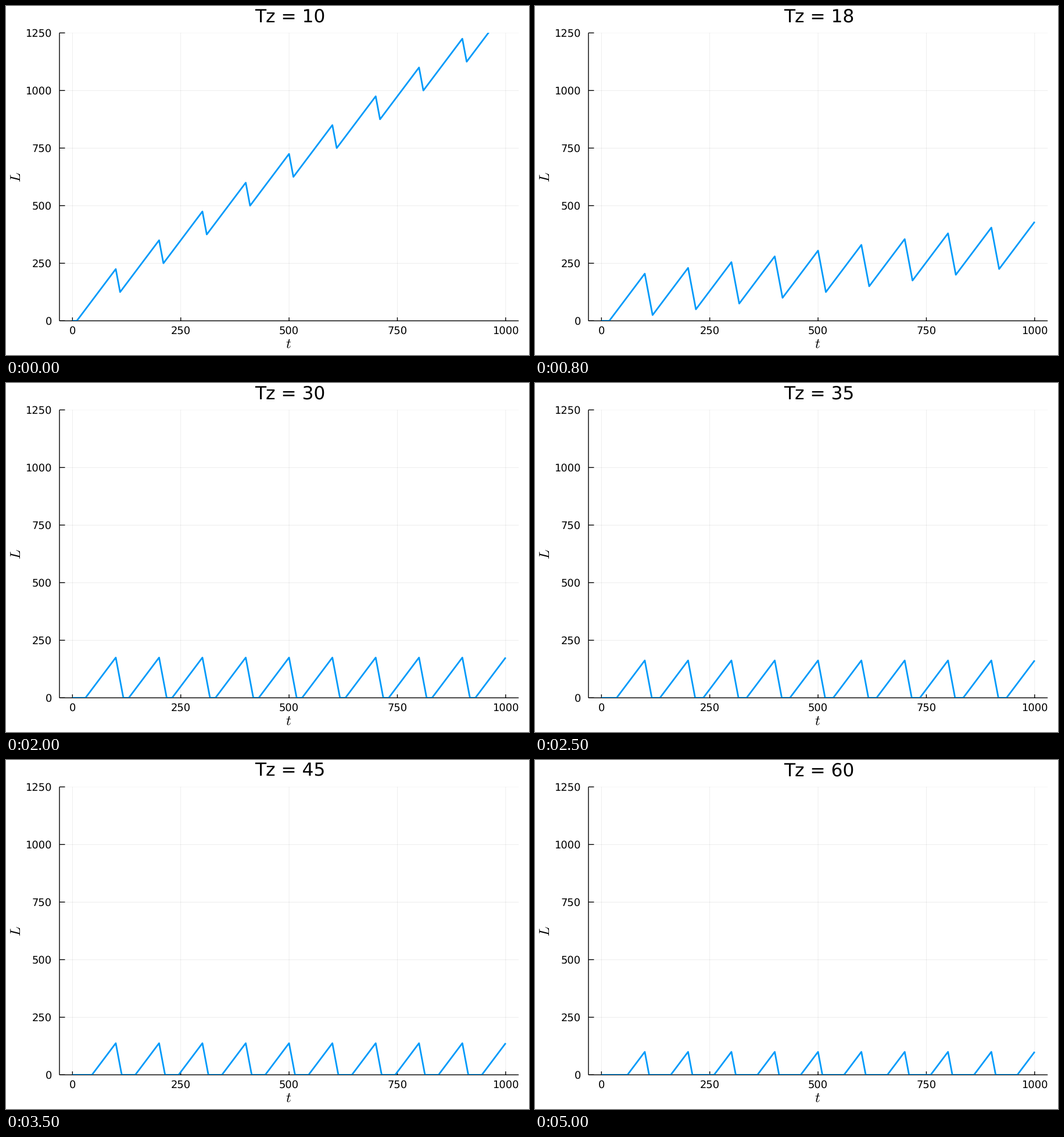
A matplotlib script that plays this animation: 900x600 px, repeating every 5.1 s.

```python
import numpy as np
import matplotlib.pyplot as plt
from matplotlib.animation import FuncAnimation
from matplotlib.patches import Rectangle

W, H, DPI = 900, 600, 100
PT = 72 / DPI  # points per pixel
LEFT, RIGHT, TOP, BOTTOM = 92.0, 882.2, 46.3, 541.3
T_MIN, T_MAX, L_MAX = -30, 1030, 1250
PERIOD, RISE, FALL = 100, 2.5, 10
FIRST_TZ, FRAMES = 10, 51

plt.rcParams.update({
    "font.family": "DejaVu Sans",
    "mathtext.fontset": "cm",
    "text.hinting": "no_hinting",
    "path.simplify": False,
})


def px(t):
    return LEFT + (t - T_MIN) / (T_MAX - T_MIN) * (RIGHT - LEFT)


def py(level):
    return BOTTOM - level / L_MAX * (BOTTOM - TOP)


def queue(tz):
    """Queue length per second: drains while t mod PERIOD < tz, else grows."""
    levels = [0.0]
    for t in range(1000):
        step = -FALL if t % PERIOD < tz else RISE
        levels.append(max(0.0, levels[-1] + step))
    return np.array(levels)


fig = plt.figure(figsize=(W / DPI, H / DPI), dpi=DPI, facecolor="white")
ax = fig.add_axes([0, 0, 1, 1])
ax.set_xlim(0, W)
ax.set_ylim(H, 0)
ax.axis("off")


def segment(x0, y0, x1, y1, width, **style):
    ax.plot([x0, x1], [y0, y1], color="black", lw=width * PT, snap=False,
            solid_capstyle="butt", **style)


def label(x, y, text, size, **style):
    return ax.text(x, y, text, fontsize=size * PT, va="baseline", **style)


X_TICK = 0.012 * (BOTTOM - TOP)
Y_TICK = 0.012 * (RIGHT - LEFT)

for value in range(0, 1251, 250):
    y = py(value)
    segment(LEFT, y, RIGHT, y, 0.7, alpha=0.05 if value == L_MAX else 0.1)
    segment(LEFT, y, LEFT + Y_TICK, y, 1.4)
    label(79, y + 6.5, str(value), 17.9, ha="right")

for value in range(0, 1001, 250):
    x = px(value)
    segment(x, TOP, x, BOTTOM, 0.7, alpha=0.1)
    segment(x, BOTTOM, x, BOTTOM - X_TICK, 1.4)
    label(x, 564, str(value), 17.9, ha="center")

segment(LEFT, BOTTOM, RIGHT, BOTTOM, 1.4)
segment(LEFT, TOP, LEFT, BOTTOM, 1.4)

label(486.5, 587.6, "$t$", 24.6, ha="center")
label(24.8, 294.5, "$L$", 24.6, ha="center", rotation=90,
      rotation_mode="anchor")
title = label(428, 27.5, "", 31.3, ha="left")

times = px(np.arange(1001))
curve, = ax.plot([], [], color="#009AFA", lw=2.8 * PT, snap=False, zorder=5,
                 solid_capstyle="butt", solid_joinstyle="round")
curve.set_clip_path(Rectangle((LEFT, TOP), RIGHT - LEFT, BOTTOM - TOP,
                              transform=ax.transData))


def draw(frame):
    tz = FIRST_TZ + frame
    title.set_text(f"Tz = {tz}")
    curve.set_data(times, py(queue(tz)))
    return title, curve


anim = FuncAnimation(fig, draw, frames=FRAMES, interval=100, repeat=True,
                     repeat_delay=0)
plt.show()
```
